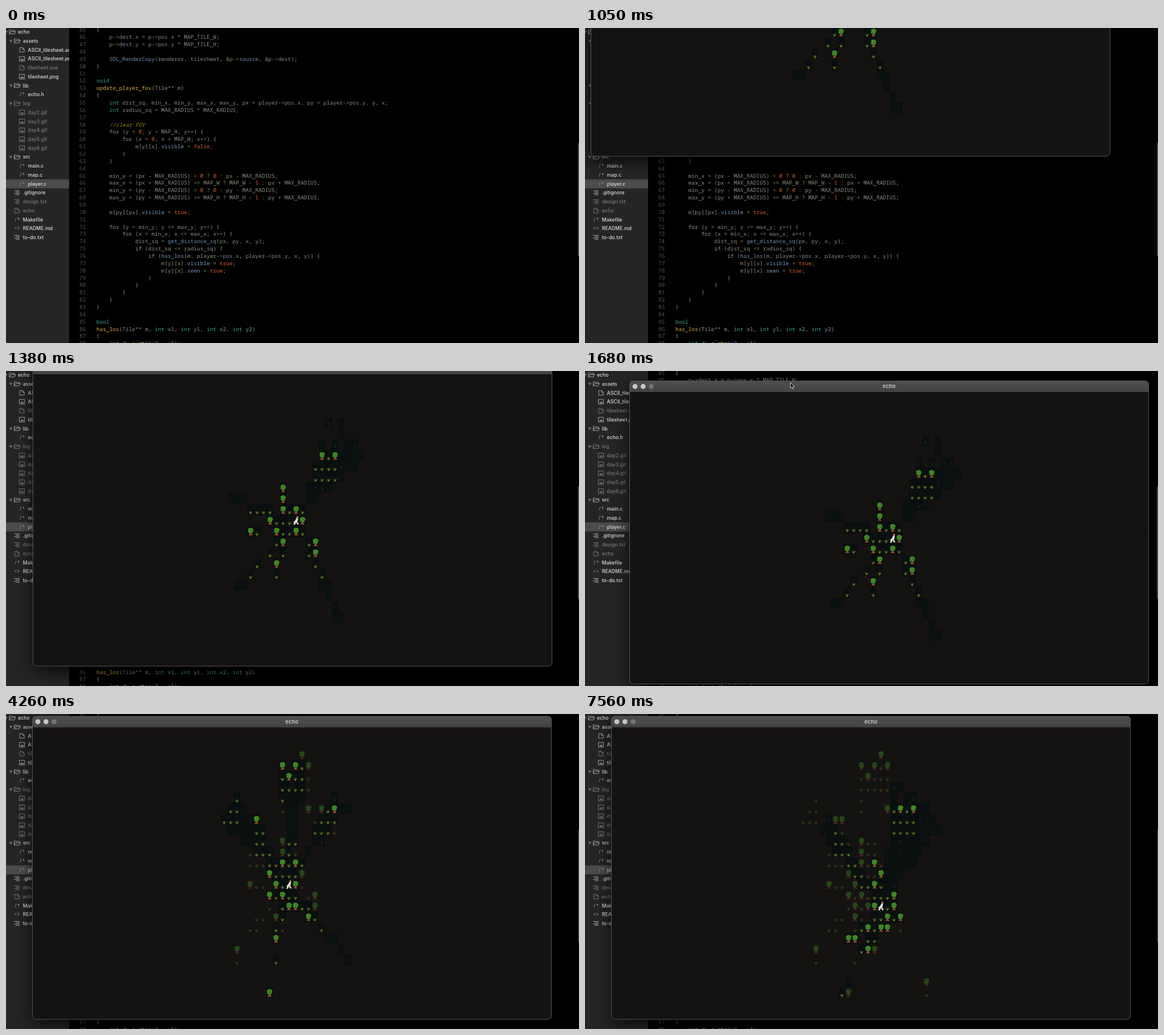
These frames come from a looping animation (1008 px wide and 555 px high, 8000 ms). An HTML page with a canvas:

```html
<!DOCTYPE html>
<html lang="en">
<head>
<meta charset="utf-8">
<title>echo</title>
<style>
html, body { margin: 0; width: 100%; height: 100%; overflow: hidden; background: #000; }
canvas { display: block; width: 1008px; height: 555px; }
</style>
</head>
<body>
<canvas id="stage" width="1008" height="555"></canvas>
<script>
const ctx = document.getElementById('stage').getContext('2d');
const LOOP = 8000;
const MONO = '"Noto Sans Mono", "DejaVu Sans Mono", monospace';
const SANS = 'Inter, "Open Sans", sans-serif';

// ---------- editor ----------
const FIRST_LINE = 45;
const CODE = `{
    p->dest.x = p->pos.x * MAP_TILE_W;
    p->dest.y = p->pos.y * MAP_TILE_H;

    SDL_RenderCopy(renderer, tilesheet, &p->source, &p->dest);
}

void
update_player_fov(Tile** m)
{
    int dist_sq, min_x, min_y, max_x, max_y, px = player->pos.x, py = player->pos.y, y, x;
    int radius_sq = MAX_RADIUS * MAX_RADIUS;

    //clear FOV
    for (y = 0; y < MAP_H; y++) {
        for (x = 0; x < MAP_W; x++) {
            m[y][x].visible = false;
        }
    }

    min_x = (px - MAX_RADIUS) < 0 ? 0 : px - MAX_RADIUS;
    max_x = (px + MAX_RADIUS) >= MAP_W ? MAP_W - 1 : px + MAX_RADIUS;
    min_y = (py - MAX_RADIUS) < 0 ? 0 : py - MAX_RADIUS;
    max_y = (py + MAX_RADIUS) >= MAP_H ? MAP_H - 1 : py + MAX_RADIUS;

    m[py][px].visible = true;

    for (y = min_y; y <= max_y; y++) {
        for (x = min_x; x <= max_x; x++) {
            dist_sq = get_distance_sq(px, py, x, y);
            if (dist_sq <= radius_sq) {
                if (has_los(m, player->pos.x, player->pos.y, x, y)) {
                    m[y][x].visible = true;
                    m[y][x].seen = true;
                }
            }
        }
    }
}

bool
has_los(Tile** m, int x1, int y1, int x2, int y2)
{
    int dx = abs(x2 - x1);`.split('\n');

const TOKEN = /\/\/.*|\b\d+\b|[A-Za-z_]\w*|[-+*<>=?:&]+|\S/g;

function tokenColor(tok, col, line) {
  if (tok.startsWith('//')) return '#8c8a12';
  if (/^(\d+|true|false)$/.test(tok)) return '#d65a30';
  if (/^(int|void|bool)$/.test(tok)) return '#3fa088';
  if (/^(for|if)$/.test(tok)) return '#8b9a86';
  if (/^\w/.test(tok)) {
    if (line[col + tok.length] === '(') {
      return col === 0 || tok === 'abs' ? '#dfae4e' : '#7393b3';
    }
    if (/^(visible|seen|[xy][12])$/.test(tok)) return '#7b98b8';
    if (/[.>]$/.test(line.slice(0, col))) return '#7d8ca0';
    return '#8d8d84';
  }
  return /^[-+*<>=?:&]/.test(tok) ? '#808a62' : '#8d8d84';
}

function drawEditor(t) {
  ctx.fillStyle = '#000';
  ctx.fillRect(0, 0, 1008, 555);
  CODE.forEach((line, i) => {
    const y = 6.5 + i * 12.857;
    ctx.font = '9.5px ' + MONO;
    ctx.fillStyle = '#545454';
    ctx.fillText(FIRST_LINE + i, 129, y);
    for (const m of line.matchAll(TOKEN)) {
      ctx.font = (m[0].startsWith('//') ? 'italic ' : '') + '9.5px ' + MONO;
      ctx.fillStyle = tokenColor(m[0], m.index, line);
      ctx.fillText(m[0], 159 + m.index * 5.705, y);
    }
  });
  ctx.fillStyle = t < 2610 ? '#474747' : t < 2760 ? '#3a3a3a' : '#2c2c2c';
  ctx.fillRect(1006, 203, 2, 199);
}

// ---------- sidebar: kind, depth, label, dimmed ----------
const FILES = [
  ['dir', 0, 'echo'], ['dir', 1, 'assets'], ['doc', 2, 'ASCII_tilesheet.ase'],
  ['img', 2, 'ASCII_tilesheet.png'], ['doc', 2, 'tilesheet.ase', 1], ['img', 2, 'tilesheet.png'],
  ['dir', 1, 'lib'], ['src', 2, 'echo.h'], ['dir', 1, 'log', 1],
  ...[2, 3, 4, 5, 6].map(n => ['img', 2, `day${n}.gif`, 1]),
  ['dir', 1, 'src'], ['src', 2, 'main.c'], ['src', 2, 'map.c'], ['src', 2, 'player.c'],
  ['txt', 1, '.gitignore'], ['txt', 1, 'design.txt', 1], ['doc', 1, 'echo', 1],
  ['src', 1, 'Makefile'], ['tag', 1, 'README.md'], ['txt', 1, 'to-do.txt']
];

function path(points, close) {
  ctx.beginPath();
  points.forEach(([x, y], i) => i ? ctx.lineTo(x, y) : ctx.moveTo(x, y));
  if (close) ctx.closePath();
}

function drawIcon(kind, x, y) {
  ctx.lineWidth = 1;
  if (kind === 'dir') {
    ctx.fillStyle = '#6e6e6e';
    path([[x - 14, y - 2], [x - 8, y - 2], [x - 11, y + 3]], true);
    ctx.fill();
    path([[x - 5, y + 3.5], [x - 5, y - 3.5], [x - 1, y - 3.5], [x, y - 2.5], [x + 4.5, y - 2.5],
      [x + 4.5, y - 0.5], [x - 3, y - 0.5], [x - 5, y + 3.5], [x + 4, y + 3.5], [x + 6, y - 0.5], [x + 4.5, y - 0.5]]);
    ctx.stroke();
  } else if (kind === 'doc') {
    path([[x - 4, y - 4], [x + 1, y - 4], [x + 4, y - 1], [x + 4, y + 4], [x - 4, y + 4]], true);
    ctx.stroke();
    path([[x + 1, y - 4], [x + 1, y - 1], [x + 4, y - 1]]);
    ctx.stroke();
  } else if (kind === 'img') {
    ctx.strokeRect(x - 4.5, y - 4, 9, 8);
    path([[x - 3, y + 2.5], [x - 1, y], [x, y + 1], [x + 1.5, y - 0.5], [x + 3, y + 2.5]], true);
    ctx.fillStyle = ctx.strokeStyle;
    ctx.fill();
  } else if (kind === 'txt') {
    for (let i = 0; i < 4; i++) {
      path([[x - (i % 2 ? 2 : 5), y - 3.5 + i * 2.3], [x + 4.5, y - 3.5 + i * 2.3]]);
      ctx.stroke();
    }
  } else {
    ctx.font = '8.5px ' + MONO;
    ctx.fillStyle = ctx.strokeStyle;
    ctx.fillText(kind === 'src' ? '/*' : '<>', x - 5, y + 3);
  }
}

function drawSidebar() {
  ctx.save();
  ctx.beginPath();
  ctx.rect(0, 0, 111, 555);
  ctx.clip();
  ctx.fillStyle = '#252525';
  ctx.fillRect(0, 0, 111, 555);
  FILES.forEach(([kind, depth, label, dim], i) => {
    const y = 7 + i * 15.74;
    if (label === 'player.c') {
      ctx.fillStyle = '#4b4b4b';
      ctx.fillRect(0, y - 8, 111, 16);
    }
    ctx.strokeStyle = dim ? '#777' : '#a2a2a2';
    drawIcon(kind, kind === 'dir' ? 11 + depth * 8.5 : 10.5 + depth * 8.8, y);
    ctx.font = '500 8.7px ' + SANS;
    ctx.fillStyle = dim ? '#7a7a7a' : '#dedede';
    ctx.fillText(label, 21 + depth * 8.8, y + 3.1);
  });
  ctx.restore();
}

// ---------- game ----------
const COL0 = 29, ROW0 = 2, CW = 11.425, CH = 19.04, RADIUS = 12;
const MAP = [
  '............T..........',
  '.........T.TwT.........',
  '.........wTwww..:......',
  '.........wwwww:........',
  '..w......w.......:..:..',
  '.ww......w...TwTwT.....',
  'www.:TT.......wwww:....',
  '.....ww.......wwww.::..',
  '.....www.Tww...:.......',
  '....wwww.Tww...:......:',
  '...TwwwwwTwTw.......:..',
  '.......TwwwwT...:..::::',
  '....Tww.TwwTw.:........',
  '.......TwTwwwwT........',
  '.......wTwTTwwT........',
  '.....ww.TwwwwTwT.......',
  '....www.wwTwTT.w.......',
  '.......TT.ww...........',
  '..T......wTT...........',
  '..w.....wT.............',
  '.......................',
  '...................T...',
  '......wT...........w...'
];
const WALK = [[0, 40, 13], [3510, 39, 13], [4260, 39, 14], [5760, 39, 15],
  [6360, 40, 15], [6960, 41, 15], [7560, 41, 16]];

const tileAt = (c, r) => (MAP[r - ROW0] || '')[c - COL0] || '.';

function hasLos(c, r, c2, r2) {
  const dx = c2 - c, dy = r2 - r, n = Math.max(Math.abs(dx), Math.abs(dy));
  const at = (d, i) => Math.sign(d) * Math.ceil(Math.abs(d) * i / n - 0.5);
  for (let i = 1; i < n; i++) {
    if (tileAt(c + at(dx, i), r + at(dy, i)) === 'T') return false;
  }
  return true;
}

function fieldOfView(c, r) {
  const cells = new Set();
  for (let y = r - RADIUS; y <= r + RADIUS; y++) {
    for (let x = c - RADIUS; x <= c + RADIUS; x++) {
      if ((x - c) ** 2 + (y - r) ** 2 <= RADIUS ** 2 && hasLos(c, r, x, y)) cells.add(x + ',' + y);
    }
  }
  return cells;
}

const VIEWS = WALK.map(([, c, r]) => fieldOfView(c, r));

function dots(color, list, w = 1, h = 1) {
  ctx.fillStyle = color;
  for (const [x, y] of list) ctx.fillRect(x, y, w, h);
}

// Sprites are drawn around the centre of their cell.
const SPRITES = {
  T() {
    ctx.fillStyle = '#8a4a2c';
    path([[-2, 2], [2, 2], [1.6, 4.5], [3.6, 7.4], [-3.4, 7.4], [-1.4, 4.5]], true);
    ctx.fill();
    ctx.fillStyle = '#3f8a22';
    ctx.beginPath();
    ctx.ellipse(0.2, -2.2, 4.8, 3.6, 0, 0, 7);
    ctx.ellipse(0, 1, 4.2, 2.8, 0, 0, 7);
    ctx.fill();
    dots('#66b53a', [[-3, -4.6], [0.5, -5], [2.6, -2.6], [-1.6, -2], [-3.6, 0], [1, 0.6]], 1.4, 1.2);
    dots('#123d10', [[-1.2, -4], [1.8, -3.8], [-4, -1.8], [0.4, -1.2], [3, 0], [-2, 1], [-0.4, 2.6]], 1.3, 1.1);
    dots('#d0713a', [[-0.8, 4], [1.6, 6], [-2.6, 6.2]]);
  },
  w() {
    ctx.strokeStyle = '#8fa52c';
    ctx.lineWidth = 0.9;
    path([[-2.6, 3.8], [-1.7, 5.6], [0, 7.8], [1.7, 5.6], [2.6, 3.8]]);
    ctx.stroke();
    path([[0.2, 2.8], [0, 7.8]]);
    ctx.stroke();
  },
  ':'() { dots('#526052', [[-0.6, 0], [0.3, 3]], 1.2, 1.2); },
  '.'() { dots('#1e2a29', [[-1, -0.3]], 2, 0.9); },
  hero() {
    ctx.fillStyle = '#f4eee8';
    path([[0.6, -4], [3.4, -3.6], [3.2, 0], [2.2, 2.2], [4.8, 6.8], [2.6, 7.6], [0.2, 4],
      [-2, 7.6], [-4.8, 8], [-3.2, 4.6], [-4.4, 2.6], [-1.6, 0.6]], true);
    ctx.fill();
    dots('#e2b09a', [[1.2, -6.6]], 2.6, 2.8);
    dots('#9c3f35', [[0.4, -8], [2.4, -7.6], [0.4, -5.8]], 1.6, 1.2);
    dots('#4a3a38', [[0.4, -1], [-1, 2.8], [1.6, 3.4]], 1, 1.2);
  }
};

function drawSprite(name, c, r, alpha) {
  ctx.save();
  ctx.globalAlpha = alpha;
  ctx.translate((c + 0.5) * CW, (r + 0.5) * CH);
  SPRITES[name]();
  ctx.restore();
}

function drawGame(t) {
  const now = WALK.findLastIndex(w => t >= w[0]);
  const view = VIEWS[now], seen = new Set();
  VIEWS.slice(0, now + 1).forEach(v => v.forEach(k => seen.add(k)));
  const [, hc, hr] = WALK[now];
  for (const key of seen) {
    const [c, r] = key.split(',').map(Number), tile = tileAt(c, r);
    if (view.has(key)) {
      const x = Math.round(c * CW), y = Math.round(r * CH);
      ctx.fillStyle = '#0a0f0f';
      ctx.fillRect(x, y, Math.round((c + 1) * CW) - x, Math.round((r + 1) * CH) - y);
      if (c !== hc || r !== hr) drawSprite(tile, c, r, 1);
    } else {
      drawSprite(tile, c, r, tile === ':' ? 0.22 : tile === '.' ? 0.2 : 0.36);
    }
  }
  drawSprite('hero', hc, hr, 1);
}

// ---------- game window: time, left, top ----------
const DRAG = [[900, 7.5, -403], [1050, 10.5, -308], [1200, 3.5, -100], [1380, 47.5, -14],
  [1530, 62.5, 10], [1680, 78.5, 17.5], [1830, 48.5, 4], [1980, 46.5, 4]];
const POINTER = [[1530, 345, 13], [1680, 361, 20], [1830, 332, 8], [1980, 342, 13],
  [2130, 439, 84], [2310, 707, 201]];
const WIN_W = 913, WIN_H = 534, BAR = 20;

function drawWindow(t) {
  const pos = DRAG.findLast(d => t >= d[0]);
  if (!pos) return;
  ctx.save();
  ctx.translate(pos[1], pos[2]);
  const frame = () => {
    ctx.beginPath();
    ctx.roundRect(0, 0, WIN_W, WIN_H, 6);
  };
  ctx.save();
  ctx.shadowColor = 'rgba(0,0,0,.75)';
  ctx.shadowBlur = 28;
  ctx.shadowOffsetY = 9;
  ctx.fillStyle = '#151312';
  frame();
  ctx.fill();
  ctx.restore();

  ctx.save();
  frame();
  ctx.clip();
  const bar = ctx.createLinearGradient(0, 0, 0, BAR);
  bar.addColorStop(0, '#4d4f4e');
  bar.addColorStop(1, '#424443');
  ctx.fillStyle = bar;
  ctx.fillRect(0, 0, WIN_W, BAR - 0.5);
  ['#c6c6c6', '#c6c6c6', '#747474'].forEach((color, i) => {
    ctx.fillStyle = color;
    ctx.beginPath();
    ctx.arc(9.5 + i * 14.3, 9.7, 4.4, 0, 7);
    ctx.fill();
  });
  ctx.font = '600 9.5px ' + SANS;
  ctx.textAlign = 'center';
  ctx.fillStyle = '#cbcbcb';
  ctx.fillText('echo', WIN_W / 2, 12.8);
  ctx.translate(0, BAR);
  drawGame(t);
  ctx.restore();

  ctx.strokeStyle = '#555';
  ctx.lineWidth = 1;
  frame();
  ctx.stroke();
  ctx.restore();
}

function drawPointer(t) {
  const p = t < 2460 && POINTER.findLast(q => t >= q[0]);
  if (!p) return;
  ctx.save();
  ctx.translate(p[1] + 0.5, p[2] + 0.5);
  path([[0, 0], [0, 9.6], [2.2, 7.6], [3.8, 11], [5.3, 10.3], [3.8, 7.1], [6.7, 6.8]], true);
  ctx.fillStyle = '#000';
  ctx.fill();
  ctx.strokeStyle = '#e6e6e6';
  ctx.lineWidth = 0.9;
  ctx.stroke();
  ctx.restore();
}

// ---------- loop ----------
const CHANGES = [...DRAG, ...POINTER, ...WALK].map(e => e[0]).concat(2460, 2610, 2760);
let shown = -1;
const start = performance.now();

function tick() {
  const t = (performance.now() - start) % LOOP;
  const step = Math.max(...CHANGES.filter(c => c <= t));
  if (step !== shown) {
    shown = step;
    drawEditor(t);
    drawSidebar();
    drawWindow(t);
    drawPointer(t);
  }
  requestAnimationFrame(tick);
}
tick();
</script>
</body>
</html>
```
